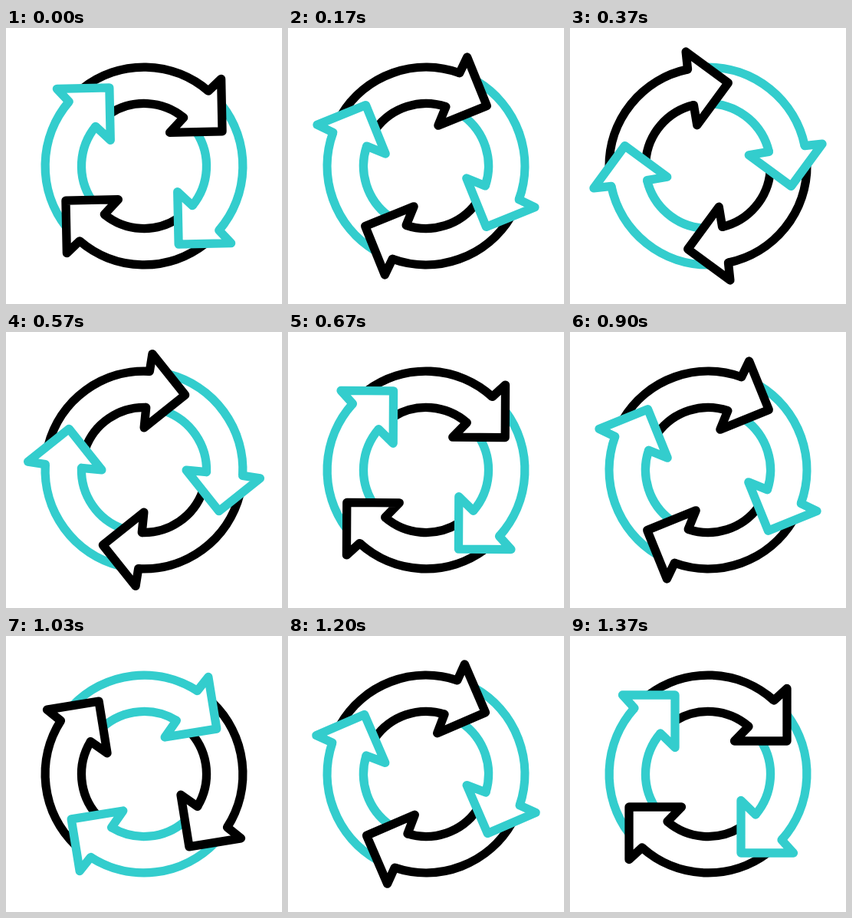
Write an HTML page that moves like this. It is 360x360 px and loops after 1.67 s.

```html
<!DOCTYPE html>
<html lang="en">
<head>
<meta charset="utf-8">
<title>Rotating arrows</title>
<style>
  html, body { margin: 0; width: 100%; height: 100%; overflow: hidden; background: #fff; }
  svg { display: block; width: 100vw; height: 100vh; }
  g { fill: none; stroke-width: 11.3; stroke-linejoin: round; }
  .head { stroke-linecap: round; }
</style>
</head>
<body>
<svg viewBox="-180 -180 360 360"><g id="ring"></g></svg>
<script>
const LOOP = 1670, STEP = 100 / 3, LAST = 41;
const COLORS = ['#000', '#33cdcd'];
const TAIL = 'M-77.7 -102.9A129 129 0 0 1 86 -96M-43 -69.2A81.5 81.5 0 0 1 53 -62';
const HEAD = 'M86 -96L103 -111.5V-43H34.5L53 -62';

// step, angle in degrees, speed in degrees per step
const KEYS = [
  [0, -1.2, -1.8],
  [5, -22, -5.4],
  [11, -53.7, -2.8],
  [13.6, -56.2, 0],
  [17, -38.6, 10.4],
  [23, 55.1, 21],
  [31, 260.8, 21],
  [LAST, 360, 0]
];

const ring = document.getElementById('ring');

function addPart(d, cls, i) {
  const path = document.createElementNS('http://www.w3.org/2000/svg', 'path');
  path.setAttribute('d', d);
  path.setAttribute('class', cls);
  path.setAttribute('stroke', COLORS[i % 2]);
  path.setAttribute('transform', `rotate(${i * 90})`);
  ring.append(path);
}

// Heads go above all tails, so each one covers the next arrow's open end.
for (const [d, cls] of [[TAIL, 'tail'], [HEAD, 'head']]) {
  for (let i = 0; i < 4; i++) addPart(d, cls, i);
}

// Cubic Hermite curve through the keys
function angleAt(k) {
  let i = 0;
  while (i < KEYS.length - 2 && k > KEYS[i + 1][0]) i++;
  const [k0, a0, v0] = KEYS[i], [k1, a1, v1] = KEYS[i + 1];
  const span = k1 - k0, u = (k - k0) / span, w = 1 - u;
  return a0 * w * w * (1 + 2 * u) + a1 * u * u * (3 - 2 * u)
    + span * u * w * (v0 * w - v1 * u);
}

// 30 steps per second, with change times rounded to 10 ms
function stepAt(ms) {
  return Math.min(LAST, Math.floor((Math.floor(ms / 10) * 10 + 4) / STEP));
}

function draw() {
  const angle = angleAt(stepAt(performance.now() % LOOP));
  ring.setAttribute('transform', `rotate(${angle.toFixed(2)})`);
  requestAnimationFrame(draw);
}
draw();
</script>
</body>
</html>
```
